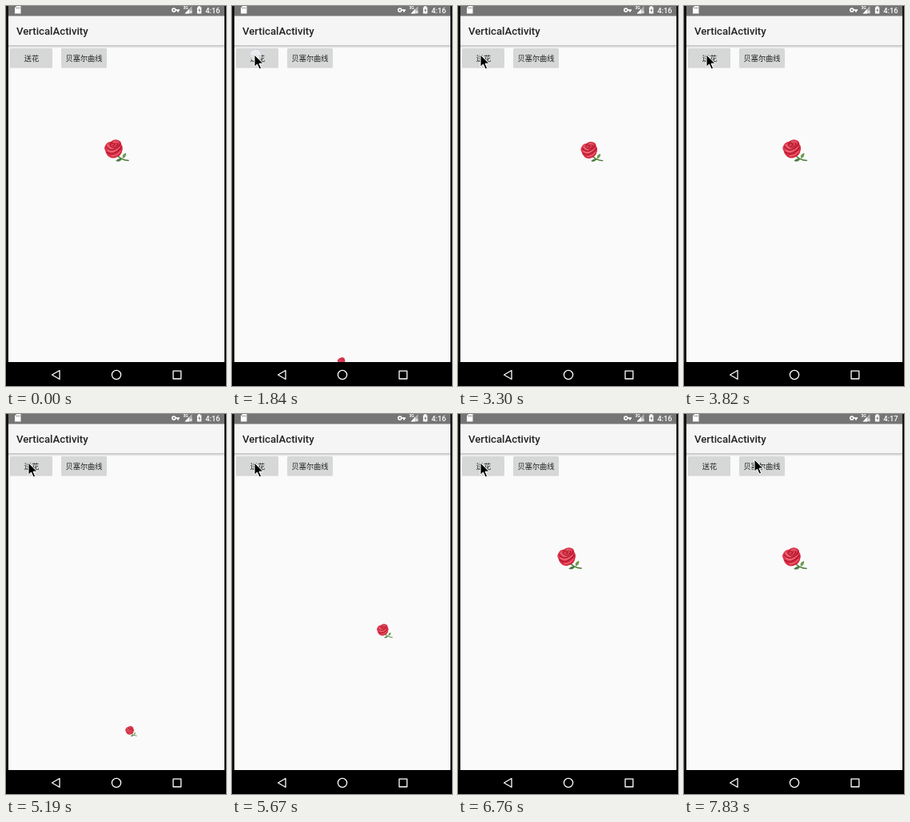
Recreate the animation shown at these times as an HTML page. Size 275 by 476 pixels, loop 8000 ms.

```html
<!DOCTYPE html>
<html lang="zh-CN">
<head>
<meta charset="utf-8">
<title>VerticalActivity</title>
<style>
  html, body { margin: 0; width: 100%; height: 100%; overflow: hidden; background: #000; }
  svg { display: block; width: 100vw; height: 100vh; }
  text { font-family: Roboto, sans-serif; }
  .title { font-size: 13.2px; font-weight: 500; fill: #242424; }
  .clock { font-size: 9.3px; font-weight: 500; fill: #fff; }
  .label { font: 9.2px "Noto Sans CJK SC", "Noto Sans CJK", sans-serif; fill: #222; text-anchor: middle; }
  .button { fill: #d6d7d7; }
  .button-shadow { fill: #000; opacity: .1; }
  .nav { fill: none; stroke: #fff; stroke-width: 1.3; stroke-linejoin: round; }
</style>
</head>
<body>
<svg viewBox="0 0 275 476">
  <defs>
    <linearGradient id="shade" x2="0" y2="1">
      <stop stop-color="#000" stop-opacity=".24"/>
      <stop offset="1" stop-color="#000" stop-opacity="0"/>
    </linearGradient>
    <radialGradient id="petal" cx=".4" cy=".35" r=".7">
      <stop stop-color="#ea4f61"/>
      <stop offset="1" stop-color="#d3223a"/>
    </radialGradient>
  </defs>

  <rect width="275" height="476" fill="#121212"/>
  <rect x="3" width="270" height="446" fill="#fafafa"/>
  <rect x="3" y="12" width="270" height="37" fill="#f5f5f5"/>
  <rect x="3" y="49" width="270" height="4" fill="url(#shade)"/>
  <rect x="3" width="270" height="12.5" fill="#757575"/>
  <text class="title" x="13" y="36">VerticalActivity</text>

  <g fill="#fff">
    <path d="M13.2 0H18.5V9.5H11V2.6Z"/>
    <path d="M13.5 1.5v2M15.3 1.5v2M17 1.5v2" stroke="#757575" stroke-width=".8"/>
    <path d="M211 4.2H217V6H216V7.6H214V6H211Z"/>
    <circle cx="209.8" cy="5.1" r="2" fill="none" stroke="#fff" stroke-width="1.6"/>
    <path d="M232.5 0V9.5H223.5Z" opacity=".45"/>
    <path d="M229 3.8V9.5H223.5Z"/>
    <path d="M229.5 6l3 3m0-3l-3 3" stroke="#fff"/>
    <text x="221.5" y="4" font-size="5" font-weight="700">3G</text>
    <path d="M240.2 .3H243V1.4H244.3V9.6H238.9V1.4H240.2Z"/>
    <path d="M242 2.8L240.2 5.8H241.5V8.3L243.2 5.1H242Z" fill="#757575"/>
  </g>
  <text class="clock" id="clock" x="249.3" y="8.5">4:16</text>

  <rect class="button-shadow" x="5" y="54" width="53" height="24" rx="1.5"/>
  <rect class="button" x="5" y="53" width="53" height="24" rx="1.5"/>
  <text class="label" x="32" y="68.5">送花</text>
  <rect class="button-shadow" x="69" y="54" width="57" height="24" rx="1.5"/>
  <rect class="button" x="69" y="53" width="57" height="24" rx="1.5"/>
  <text class="label" x="97.5" y="68.5">贝塞尔曲线</text>

  <g id="rose" stroke-linecap="round" stroke-linejoin="round">
    <path d="M1 6Q6 12 15 12.5" fill="none" stroke="#4d7a35" stroke-width="1.6"/>
    <path d="M8 10Q6 5 12 3Q13 8 8 10Z" fill="#6c9a52"/>
    <path d="M7 10.5Q3 9 -1 13Q4 15.5 7 10.5Z" fill="#467a3a"/>
    <path d="M-3 7Q2 10 4 6L7 2L2 4Z" fill="#5d8a48"/>
    <path d="M-14 -6Q-12 -11 -7 -11Q-3 -15 2 -13Q6 -12 6 -8Q9 -4 7 1Q6 6 1 8Q-4 11 -9 8Q-13 5 -14 0Q-16 -3 -14 -6Z" fill="url(#petal)"/>
    <path d="M-13 -5Q-9 0 -4 -1Q3 -3 5 -9M-12 2Q-7 6 -2 3Q4 0 6 -4M-8 -9Q-4 -13 1 -10Q3 -6 -2 -4Q-7 -3 -8 -7Q-5 -10 -2 -8Q-2 -6 -5 -6" fill="none" stroke="#a9152c" stroke-width="1.1"/>
    <path d="M-11 -7Q-9 -3 -5 -2.5M-11 0Q-7 3 -3 1Q2 -1 4 -4M-6 7Q1 7 5 1M-4 -11Q-1 -12 2 -10" fill="none" stroke="#f58b96" stroke-width=".9"/>
  </g>

  <rect y="446" width="275" height="30"/>
  <g class="nav">
    <path d="M57.5 462L67 456.5V467.5Z"/>
    <circle cx="138" cy="462" r="5.6"/>
    <rect x="209" y="457.2" width="9.8" height="9.8"/>
  </g>

  <circle id="touch" cx="29.5" cy="61.5" r="7.3" fill="#f0f2f5" fill-opacity=".75" stroke="#bfc2c6" stroke-width=".5"/>
  <path id="cursor" d="M0 0V15.2L3.5 12L6.1 18L8.6 16.9L6 11.1H10.9Z" fill="#000" stroke="#fff" stroke-width="1"/>
</svg>
<script>
  const LOOP = 8000, STEP = 58.3, FLIGHT = 2000;
  const REST = { x: 138, y: 181 }, START = { x: 138, y: 446 }, BEND = { x: 249, y: 162 };
  // press: the tap is seen; launch: the flight clock starts
  const flights = [{ press: 1840, launch: 1820 }, { press: 4780, launch: 4808 }];
  const moves = [
    { from: 290, to: 640, a: [1, 82], b: [28, 61] },
    { from: 7420, to: 7830, a: [28, 61], b: [88, 57] }
  ];
  const [rose, cursor, touch, clock] =
    ["rose", "cursor", "touch", "clock"].map(id => document.getElementById(id));

  const clamp = v => Math.min(1, Math.max(0, v));
  const ease = p => (1 - Math.cos(Math.PI * clamp(p))) / 2;
  const hold = (t, from) => from + Math.floor((t - from) / STEP) * STEP;
  const quad = (a, b, c, u) => (1 - u) ** 2 * a + 2 * u * (1 - u) * b + u * u * c;
  const show = (el, on) => el.setAttribute("visibility", on ? "visible" : "hidden");
  const place = (el, x, y, s = 1) =>
    el.setAttribute("transform", `translate(${x} ${y}) scale(${s})`);

  function drawRose(t) {
    const flight = flights.findLast(f => t >= f.press);
    const u = flight ? ease((hold(t, flight.press) - flight.launch + 8) / FLIGHT) : 1;
    place(rose, quad(START.x, BEND.x, REST.x, u), quad(START.y, BEND.y, REST.y, u), .42 + .58 * u);
    show(touch, flight && t < flight.press + 2 * STEP);
  }

  function drawCursor(t) {
    const move = moves.findLast(m => t >= m.from);
    show(cursor, move);
    if (!move) return;
    const span = move.to - move.from;
    const p = ease((hold(t, move.from) - move.from + STEP / 2) / span);
    const at = t >= move.to ? 1 : p;
    place(cursor, ...move.a.map((v, i) => v + (move.b[i] - v) * at));
  }

  function frame(now) {
    const t = now % LOOP;
    drawRose(t);
    drawCursor(t);
    clock.textContent = t < 7060 ? "4:16" : "4:17";
    requestAnimationFrame(frame);
  }
  frame(0);
</script>
</body>
</html>
```
